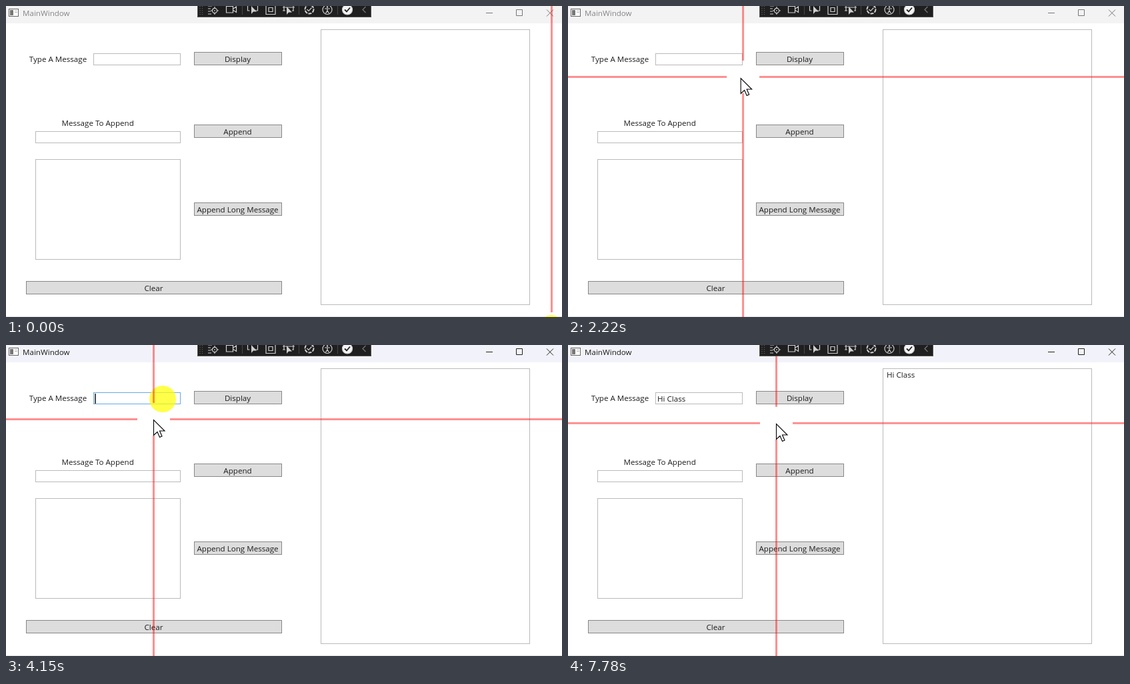
An HTML page for the animation above (8 s loop, 834x467 px).

```html
<!DOCTYPE html>
<html lang="en">
<head>
<meta charset="utf-8">
<title>MainWindow</title>
<style>
  html, body { margin: 0; width: 100%; height: 100%; overflow: hidden; background: #fff; }
  svg { display: block; width: 100vw; height: 100vh; }
  text { font: 11.6px "Open Sans", "Noto Sans", sans-serif; fill: #1c1c1c; white-space: pre; }
  .mid { text-anchor: middle; }
  .box { fill: #fff; stroke: #b9babd; }
  .btn { fill: #ddd; stroke: #888; }
  .tools { fill: none; stroke: #cfcfcf; stroke-width: 1.2; }
  .cross { fill: #f00; fill-opacity: .44; }
</style>
</head>
<body>
<svg id="stage" viewBox="0 0 834 467" xmlns="http://www.w3.org/2000/svg">
  <rect width="834" height="467" fill="#fff"/>
  <rect id="bar" width="834" height="26"/>
  <path d="M0 466.5H834" stroke="#e4e4e4"/>
  <g>
    <rect x="4.5" y="4.5" width="14" height="11" fill="#fff" stroke="#666"/>
    <path d="M6 6h5v8h-5z" fill="#777"/>
    <path d="M13 7h4M13 9.5h4" stroke="#bbb"/>
  </g>
  <text id="title" x="25" y="15">MainWindow</text>
  <path id="chrome" fill="none" d="M720 10.5h10M765.5 5.5h9v9h-9zM811 5.5l10 10M821 5.5l-10 10"/>
  <g id="form"></g>
  <text id="typed" x="134" y="84.5"></text>
  <rect id="caret" y="73" width="1.4" height="15" fill="#000"/>
  <text id="output" x="478" y="49">Hi Class</text>
  <g id="clicks"></g>
  <g class="cross">
    <rect id="left" height="3"/><rect id="right" height="3"/>
    <rect id="up" y="0" width="3"/><rect id="down" width="3"/>
  </g>
  <g class="tools">
    <rect x="287.5" y="-2" width="260" height="18.5" fill="#1f1f1f" stroke="#555" stroke-width="1"/>
    <path d="M291 0V14M294.5 0V14" stroke="#666" stroke-dasharray="1 2"/>
    <path d="M354.5 0V13M439.5 0V13M497.5 0V13" stroke="#444"/>
    <path d="M303 0h6M303 4h4M303 8h4M303 12h5"/>
    <circle cx="313" cy="7" r="3.6"/>
    <path d="M313 1v3M313 10v3M307 7h3M316 7h3M313 6v2"/>
    <path d="M330.5 0.5h10v9.5h-10zM341 4l4.5-3v8.500l-4.500-3"/>
    <path d="M362.500 0v7h3M377.500 0v7h-4"/>
    <path d="M368 0v12l3-3.500h5z" fill="#cfcfcf" stroke="none"/>
    <path d="M390 -1h14v13.500h-14zM394 2.500h6v6h-6z"/>
    <path d="M417 0v7M415 2h4M415 7h4M431 0v7M429 2h4M429 7h3M419 2h10"/>
    <path d="M421 1v12l3-3.500h5z" fill="#cfcfcf" stroke="none"/>
    <circle cx="455" cy="5" r="6.500" stroke-width="2" stroke-dasharray="5 1.500"/>
    <path d="M451.500 5l2.500 2.500 4.500-5"/>
    <circle cx="482" cy="5.500" r="7"/>
    <circle cx="482" cy="1.500" r="1.200" fill="#cfcfcf" stroke="none"/>
    <path d="M478 4h8M482 4v3l-2.500 4M482 7l2.500 4"/>
    <circle cx="512" cy="5.500" r="7.500" fill="#f4f4f4"/>
    <path d="M508 5.500l3 3 5-6" stroke="#1f1f1f" stroke-width="1.800"/>
    <path d="M539.500 1l-4.500 4.500 4.500 4.500" stroke="#777"/>
  </g>
  <path id="pointer" d="M.5 .5V23.500L6 18.500L9.500 26.500L13 25L9.500 17H17Z" fill="#fff" stroke="#000" stroke-width="1.100"/>
</svg>
<script>
const NS = 'http://www.w3.org/2000/svg';
const LOOP = 8000, GAP = 24.5, LAG = 20;
const FOCUS = 3450, PRESS = 6900, RELEASE = 7090;
const $ = id => document.getElementById(id);

function add(parent, tag, attrs, text = '') {
  const el = document.createElementNS(NS, tag);
  set(el, attrs);
  el.textContent = text;
  return parent.appendChild(el);
}
function set(el, attrs) {
  for (const k in attrs) el.setAttribute(k, attrs[k]);
}

const form = $('form');
const frame = (cls, x, y, w, h) =>
  add(form, 'rect', { class: cls, x: x + .5, y: y + .5, width: w, height: h });
const label = (x, y, text) => add(form, 'text', { class: 'mid', x, y }, text);
function button(x, y, w, text) {
  const el = frame('btn', x, y, w, 19);
  label(x + w / 2, y + 14.5, text);
  return el;
}

const input = frame('box', 131, 71, 130, 17);
frame('box', 44, 188, 217, 17);
frame('box', 44, 230, 217, 150);
frame('box', 472, 35, 313, 413);
label(78, 83.5, 'Type A Message');
label(137.7, 179.5, 'Message To Append');
const buttons = [
  button(282, 69, 131, 'Display'),
  button(282, 178, 131, 'Append'),
  button(282, 295, 131, 'Append Long Message'),
  button(30, 413, 383, 'Clear')
];

const linear = u => u;
const out = u => 1 - (1 - u) ** 2;
const inOut = u => u * u * (3 - 2 * u);

// pointer path: time, x, y, easing into this point
const path = [
  [700, 818, 485, linear],
  [1390, 394, 115, u => 1 - (1 - u) ** 1.5],
  [1610, 332, 95, linear],
  [1830, 312, 92, out],
  [1920, 312, 92, linear],
  [2300, 252, 110, inOut],
  [2480, 252, 110, linear],
  [2910, 242, 88, linear],
  [3140, 235, 82, out],
  [3370, 235, 82, linear],
  [3450, 235, 81, linear],
  [3540, 235, 81, linear],
  [4000, 221, 112, inOut],
  [6400, 221, 112, linear],
  [6860, 310, 76, out],
  [7170, 313, 80, inOut],
  [7250, 313, 80, linear],
  [7780, 312, 118, inOut]
];

function pointerAt(t) {
  const i = path.findIndex(p => p[0] > t);
  if (i === 0) return path[0].slice(1, 3);
  if (i < 0) return path[path.length - 1].slice(1, 3);
  const [t0, x0, y0] = path[i - 1], [t1, x1, y1, ease] = path[i];
  const k = ease((t - t0) / (t1 - t0));
  return [x0 + (x1 - x0) * k, y0 + (y1 - y0) * k];
}

const message = 'Hi Class';
const keyTimes = [4910, 5140, 5220, 5450, 5620, 5690, 5760, 5920];

const clicks = [[-240, 818, 484], [FOCUS, 235, 81], [PRESS, 311, 78]].map(([at, cx, cy]) => ({
  at, el: add($('clicks'), 'circle', { cx, cy, r: 20, fill: '#ff0' })
}));

function clickOpacity(age) {
  if (age < 0) return 0;
  return .72 * Math.max(0, Math.min(1, (860 - age) / 160));
}

function over(el, x, y) {
  const b = el.getBBox();
  return x >= b.x && x <= b.x + b.width && y >= b.y && y <= b.y + b.height;
}

function drawCross(x, y) {
  set($('left'), { y: y - 1.5, width: Math.max(0, x - GAP) });
  set($('right'), { x: x + GAP, y: y - 1.5, width: Math.max(0, 834 - x - GAP) });
  set($('up'), { x: x - 1.5, height: Math.max(0, y - GAP) });
  set($('down'), { x: x - 1.5, y: y + GAP, height: Math.max(0, 467 - y - GAP) });
}

function render(t) {
  const active = t >= FOCUS;
  $('bar').style.fill = active ? '#f2f3fa' : '#f3f3f3';
  $('title').style.fill = active ? '#1a1a1a' : '#858585';
  $('chrome').style.stroke = active ? '#222' : '#777';

  const [x, y] = pointerAt(t);
  const [cx, cy] = pointerAt(t - LAG);
  set($('pointer'), { transform: `translate(${x} ${y})` });
  drawCross(cx + .5, cy - .5);

  const focused = active && t < PRESS;
  input.style.stroke = focused ? '#6aa9e4' : over(input, x, y) ? '#7eb4ea' : '';
  for (const b of buttons) {
    const hover = over(b, x, y);
    const down = hover && t >= PRESS && t < RELEASE;
    b.style.fill = down ? '#c4e5f6' : hover ? '#bee6fd' : '';
    b.style.stroke = down ? '#2c628b' : hover ? '#5a9bc8' : '';
  }

  const typed = $('typed');
  typed.textContent = message.slice(0, keyTimes.filter(k => t >= k).length);
  const caretOn = (t >= FOCUS && t < 4230) || (t >= 4700 && t < 6460);
  set($('caret'), {
    x: 133.3 + typed.getComputedTextLength(),
    visibility: caretOn ? 'visible' : 'hidden'
  });
  set($('output'), { visibility: t >= RELEASE ? 'visible' : 'hidden' });
  for (const c of clicks) set(c.el, { opacity: clickOpacity(t - c.at) });
}

const start = performance.now();
function tick() {
  render((performance.now() - start) % LOOP);
  requestAnimationFrame(tick);
}
tick();
</script>
</body>
</html>
```
